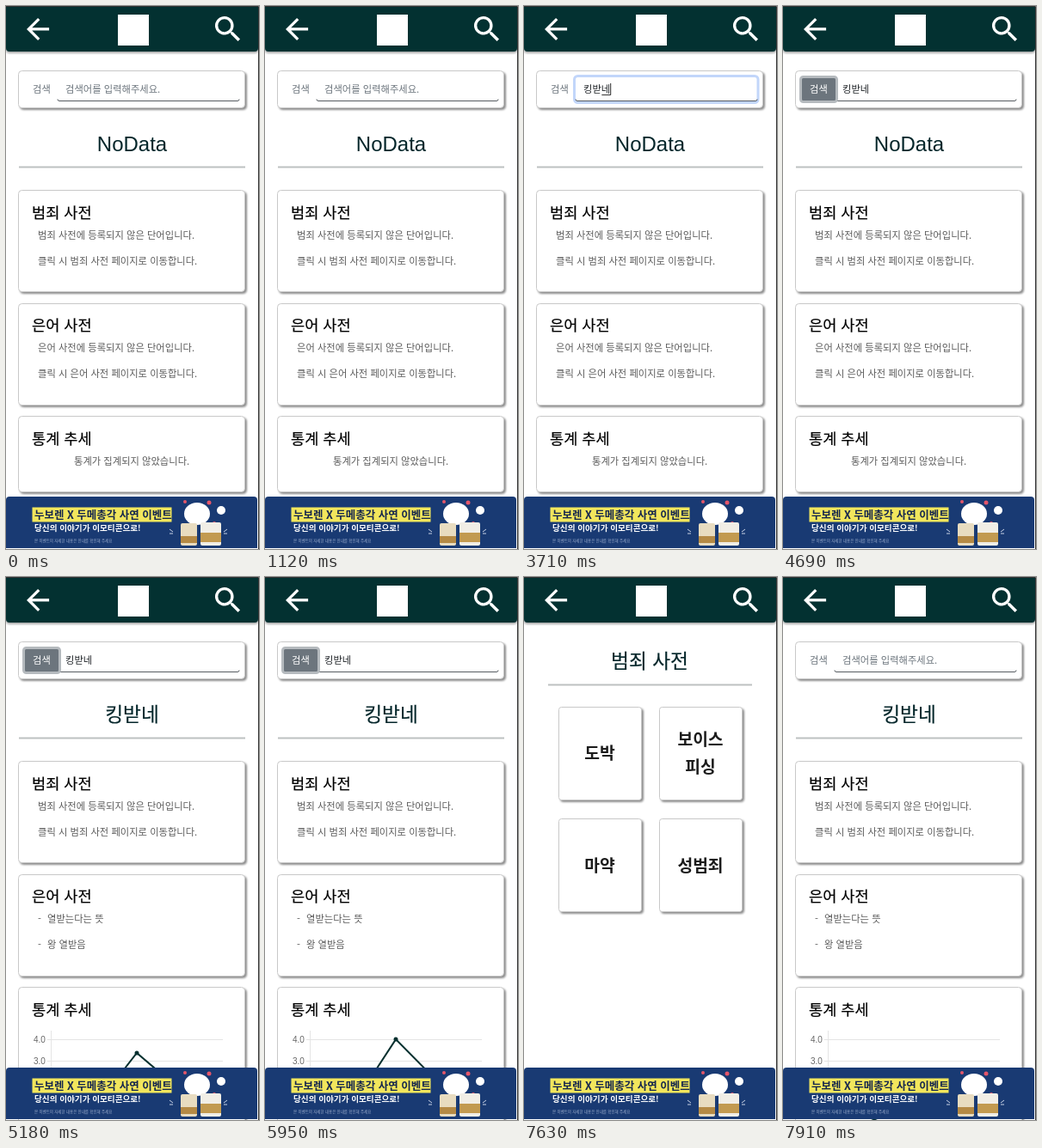
These frames come from a looping animation (294x632 px, 8 s). An HTML page:

```html
<!DOCTYPE html>
<html lang="ko">
<head>
<meta charset="utf-8">
<style>
html, body { margin: 0; width: 100%; height: 100%; overflow: hidden; background: #fff; }
svg { display: block; width: 294px; height: 632px; font: 11.3px "Noto Sans CJK KR", "Noto Sans CJK JP", sans-serif; fill: #5b5b5b; }
.card { fill: #fff; stroke: #c8c8c8; filter: drop-shadow(2.5px 2.5px 1px #8c8c8c); }
.head { font-size: 17.6px; fill: #000; stroke: #000; stroke-width: .2px; }
.title { font-size: 22.7px; fill: #04262a; stroke: #04262a; stroke-width: .2px; text-anchor: middle; }
.latin { font: 24px "Liberation Sans", Arial, sans-serif; stroke: none; }
.tile { font-size: 19.3px; font-weight: 700; fill: #1c1c1c; text-anchor: middle; }
.tick { font: 10px "Liberation Sans", Arial, sans-serif; fill: #666; }
.rule { fill: #bdc1c1; }
.ad { font-weight: 900; }
</style>
</head>
<body>
<svg viewBox="0 0 294 632">
  <g id="searchPage">
    <rect class="card" x="14.5" y="75.5" width="263" height="43" rx="4"/>
    <rect id="ring" x="58.5" y="81.5" width="213.5" height="31" rx="4" fill="#fff" stroke="#c2d6fa" stroke-width="3"/>
    <path d="M60 108.5q0 2 2 2H269q2 0 2-2" fill="none" stroke="#555b60"/>
    <text id="typed" x="69" y="101"></text>
    <path id="underline" stroke="#333" fill="none"/>
    <path id="caret" stroke="#222" fill="none"/>
    <rect id="button" x="20.5" y="82.5" width="42" height="29" rx="3" fill="#6c757d" stroke="#b5babe" stroke-width="3"/>
    <text id="label" x="31" y="101">검색</text>
    <rect class="rule" x="15" y="186.5" width="263" height="2"/>
    <rect class="card" x="14.5" y="214.5" width="263" height="118" rx="4"/>
    <text class="head" x="30" y="247">범죄 사전</text>
    <text x="37" y="271">범죄 사전에 등록되지 않은 단어입니다.</text>
    <text x="37" y="301">클릭 시 범죄 사전 페이지로 이동합니다.</text>
    <rect class="card" x="14.5" y="346.5" width="263" height="118" rx="4"/>
    <text class="head" x="30" y="378">은어 사전</text>
    <g id="empty">
      <text class="title latin" x="146.5" y="168.5">NoData</text>
      <text x="37" y="402">은어 사전에 등록되지 않은 단어입니다.</text>
      <text x="37" y="432">클릭 시 은어 사전 페이지로 이동합니다.</text>
      <rect class="card" x="14.5" y="477.5" width="263" height="88" rx="4"/>
      <text x="79" y="533.5">통계가 집계되지 않았습니다.</text>
    </g>
    <g id="result">
      <text class="title" x="146.5" y="168">킹받네</text>
      <text x="37" y="402">-</text><text x="48" y="402">열받는다는 뜻</text>
      <text x="37" y="432">-</text><text x="48" y="432">왕 열받음</text>
      <rect class="card" x="14.5" y="477.5" width="263" height="180" rx="4"/>
      <path d="M48 538.5H252M48 563.5H252M52.5 528V600" stroke="#e4e4e4"/>
      <text class="tick" x="32" y="542">4.0</text>
      <text class="tick" x="32" y="567">3.0</text>
      <path id="line" fill="none" stroke="#06302f" stroke-width="2"/>
      <circle id="peak" cx="152" r="2.5" fill="#06302f"/>
    </g>
    <text class="head" x="30" y="510">통계 추세</text>
  </g>
  <g id="crimePage">
    <text class="title" x="146" y="106">범죄 사전</text>
    <rect class="rule" x="28" y="124.5" width="237" height="2"/>
    <rect class="card" x="40.5" y="151.5" width="96" height="108" rx="3"/>
    <rect class="card" x="157.5" y="151.5" width="96" height="108" rx="3"/>
    <rect class="card" x="40.5" y="281.5" width="96" height="108" rx="3"/>
    <rect class="card" x="157.5" y="281.5" width="96" height="108" rx="3"/>
    <g class="tile">
      <text x="88" y="212">도박</text>
      <text x="205" y="196">보이스</text><text x="205" y="228">피싱</text>
      <text x="88" y="343">마약</text>
      <text x="205" y="343">성범죄</text>
    </g>
  </g>
  <g id="header" fill="#fff">
    <path d="M0 0H293V49q0 4-4 4H4q-4 0-4-4Z" fill="#033131" style="filter:drop-shadow(0 2px 1px #aaa)"/>
    <path transform="translate(17.5 7.4) scale(1.63)" d="M20 11H7.83l5.59-5.59L12 4l-8 8 8 8 1.41-1.41L7.83 13H20z"/>
    <rect x="130" y="10" width="36" height="36"/>
    <path transform="translate(238 7) scale(1.66)" d="M15.500 14h-.79l-.28-.27A6.500 6.500 0 1 0 13.730 14.430l.27.28v.79l5 4.990L20.490 19zm-6 0a4.500 4.500 0 1 1 0-9 4.500 4.500 0 0 1 0 9z"/>
  </g>
  <g id="banner">
    <path d="M0 631V575q0-4 4-4H288q4 0 4 4V631Z" fill="#193a73"/>
    <rect x="30.5" y="583.5" width="162" height="17" fill="#f2e65c"/>
    <text class="ad" x="33" y="596.5" font-size="12.5" fill="#15264d">누보렌 X 두메총각 사연 이벤트</text>
    <text class="ad" x="33" y="611" font-size="9.6" fill="#fff">당신의 이야기가 이모티콘으로!</text>
    <text x="33" y="624" font-size="4.5" fill="#9aaccc">본 이벤트의 자세한 내용은 안내를 확인해 주세요</text>
    <ellipse cx="222" cy="591" rx="15" ry="13" fill="#fff"/>
    <g fill="#e4566a"><circle cx="208" cy="577" r="2"/><circle cx="236" cy="578" r="2.5"/><circle cx="242" cy="602" r="2"/></g>
    <circle cx="250" cy="587" r="5" fill="#fff"/>
    <rect x="203" y="602" width="19" height="26" rx="2" fill="#e8dcc0"/>
    <rect x="203" y="617" width="19" height="8" fill="#b58a45"/>
    <rect x="226" y="601" width="24" height="27" rx="2" fill="#f1eee6"/>
    <rect x="226" y="613" width="24" height="11" fill="#c29a50"/>
    <path d="M190 609l4 3M190 614h4M257 609l-4 3M257 614h-4" stroke="#c9d3e6"/>
  </g>
  <path d="M0 .5H293.500V632" fill="none" stroke="#333"/>
</svg>
<script>
const LOOP = 8000, FOCUS = 2310, PRESS = 4410, RESULT = 4810, LEAVE = 6580, BACK = 7840;
const KEYS = [[2590, 'ㅋ'], [2660, '키'], [2800, '킹'], [2940, '킹ㅂ'], [3080, '킹바'],
  [3150, '킹받'], [3290, '킹받ㄴ'], [3430, '킹받네']];
const CHAR = 10.4;
const $ = id => document.getElementById(id);
const show = (id, on) => $(id).style.display = on ? '' : 'none';
const clamp = v => Math.max(0, Math.min(1, v));

function drawField(t) {
  const focused = t >= FOCUS && t < PRESS;
  const last = t < BACK && KEYS.filter(k => t >= k[0]).pop();
  const text = last ? last[1] : '';
  $('typed').textContent = text || '검색어를 입력해주세요.';
  $('typed').setAttribute('fill', text ? '#212529' : '#6c757d');
  const end = 69.5 + CHAR * text.length;
  $('caret').setAttribute('d', `M${end} 90V103.5`);
  $('underline').setAttribute('d', `M${end - CHAR} 103.5H${end}`);
  show('ring', focused);
  show('caret', focused && Math.floor((t - (last ? last[0] : FOCUS)) / 500) % 2 === 0);
  show('underline', focused && text);

  const pressed = t < BACK ? clamp((t - PRESS) / 150) : 0;
  $('button').setAttribute('opacity', pressed);
  $('label').setAttribute('fill', pressed > 0.5 ? '#fff' : '#6c757d');
}

function drawChart(t) {
  const p = clamp((t - (t < BACK ? RESULT : BACK)) / 1000);
  const grow = 1 - (1 - p) ** 4;
  const y = value => 639.3 - 25.3 * value * grow;
  $('line').setAttribute('d', `M102.5 ${y(1)}L152 ${y(4)}L202 ${y(2)}`);
  $('peak').setAttribute('cy', Math.min(y(4), 620));
}

function frame(now) {
  const t = now % LOOP;
  const away = t >= LEAVE && t < BACK;
  show('searchPage', !away);
  show('crimePage', away);
  show('empty', t < RESULT);
  show('result', t >= RESULT);
  drawField(t);
  drawChart(t);
  requestAnimationFrame(frame);
}
requestAnimationFrame(frame);
</script>
</body>
</html>
```
